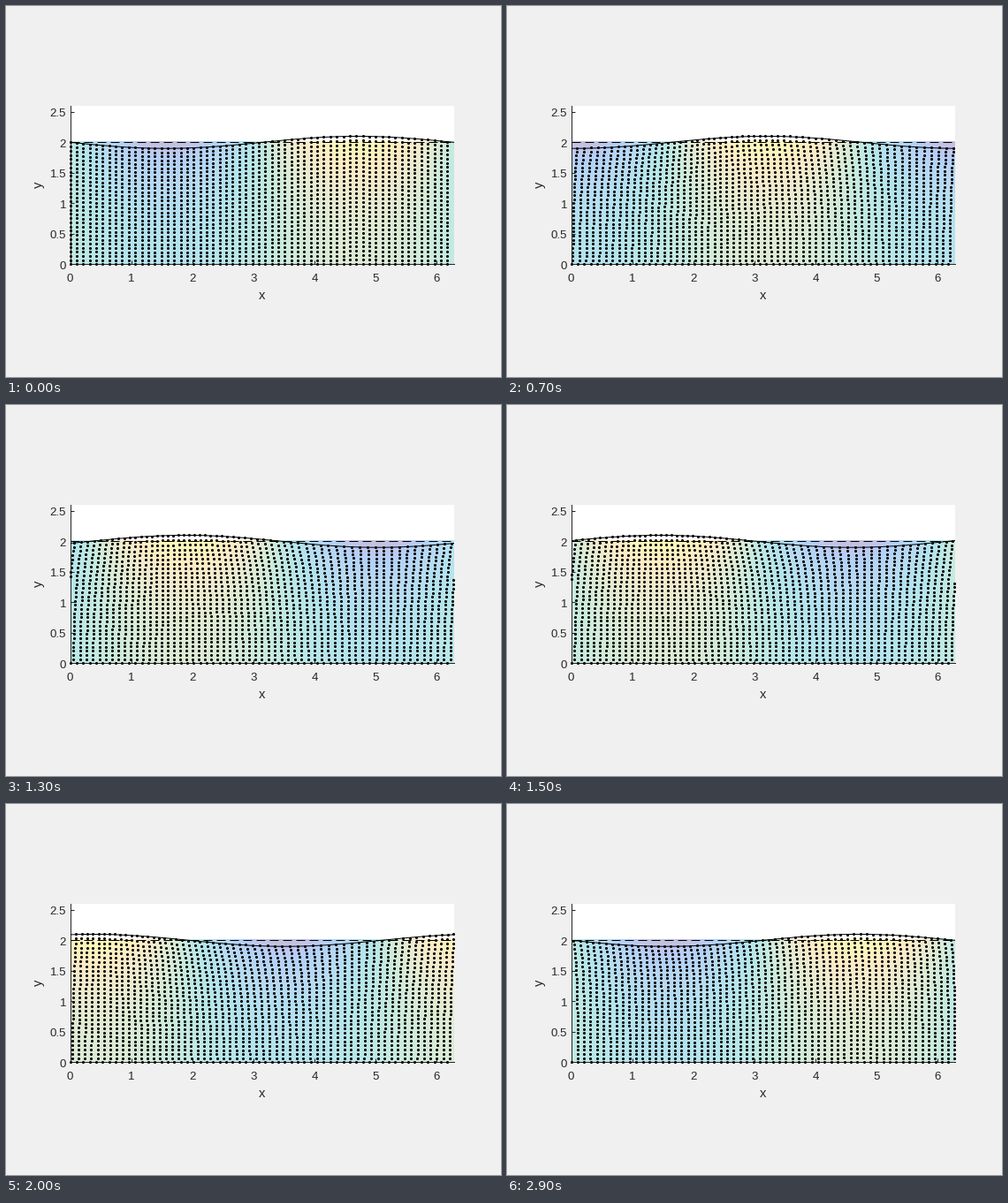
Write a matplotlib script that moves like this. It is 560 px wide and 420 px high and loops after 3000 ms.

```python
import numpy as np
import matplotlib.pyplot as plt
from matplotlib.animation import FuncAnimation
from matplotlib.colors import LinearSegmentedColormap

W, H, DPI = 560, 420, 100
FRAMES, INTERVAL = 30, 100
PX = 72 / DPI  # points per pixel

AMP, DEPTH, Y_MAX = 0.1, 2.0, 2.6
PERIOD = 2 * np.pi
COLS, ROWS = 59, 30
INK = "#262626"

plt.rcParams["font.family"] = "Liberation Sans"

STOPS = [
    (0.000, (0.208, 0.166, 0.529)), (0.063, (0.196, 0.265, 0.728)),
    (0.111, (0.059, 0.360, 0.868)), (0.159, (0.017, 0.427, 0.879)),
    (0.238, (0.078, 0.504, 0.838)), (0.317, (0.034, 0.597, 0.820)),
    (0.381, (0.023, 0.654, 0.777)), (0.444, (0.084, 0.693, 0.706)),
    (0.508, (0.218, 0.725, 0.619)), (0.571, (0.395, 0.746, 0.524)),
    (0.651, (0.610, 0.747, 0.434)), (0.730, (0.786, 0.736, 0.363)),
    (0.794, (0.914, 0.726, 0.306)), (0.841, (0.994, 0.746, 0.240)),
    (0.905, (0.979, 0.827, 0.163)), (0.952, (0.959, 0.895, 0.113)),
    (1.000, (0.976, 0.983, 0.054)),
]
CMAP = LinearSegmentedColormap.from_list("water", STOPS, N=256)


def phase(frame):
    return PERIOD * frame / (FRAMES - 1)


def elevation(x, ph):
    return -AMP * np.sin(x + ph)


def velocity(pos, ph):
    """Linear wave velocity per unit of phase; the bed row stays put."""
    x, y = pos
    u = AMP * np.sin(x + ph) * np.cosh(y) / np.sinh(DEPTH)
    v = -AMP * np.cos(x + ph) * np.sinh(y) / np.sinh(DEPTH)
    return np.array([u, v]) * (y > 0)


def rk4(pos, ph, h):
    k1 = velocity(pos, ph)
    k2 = velocity(pos + h / 2 * k1, ph + h / 2)
    k3 = velocity(pos + h / 2 * k2, ph + h / 2)
    k4 = velocity(pos + h * k3, ph + h)
    return pos + h / 6 * (k1 + 2 * k2 + 2 * k3 + k4)


def particle_paths(substeps=4):
    x, s = np.meshgrid(np.arange(COLS) * PERIOD / COLS, np.linspace(0, 1, ROWS))
    pos = np.array([x, s * (DEPTH + elevation(x, 0))])
    h = phase(1) / substeps
    paths = [pos]
    for frame in range(FRAMES - 1):
        for k in range(substeps):
            pos = rk4(pos, phase(frame) + k * h, h)
        paths.append(pos)
    return paths


paths = particle_paths()

fig = plt.figure(figsize=(W / DPI, H / DPI), dpi=DPI, facecolor="#f0f0f0")
left, top, width = 72.6, 112.9, 434.0
height = Y_MAX * width / PERIOD
bottom = top + height
ax = fig.add_axes([left / W, 1 - bottom / H, width / W, height / H])
ax.set(xlim=(0, PERIOD), ylim=(0, Y_MAX), xticks=range(7),
       yticks=np.arange(0, 2.6, 0.5), facecolor="white")
ax.tick_params(direction="in", length=4.3 * PX, width=PX, color=INK,
               labelbottom=False, labelleft=False)
for side, spine in ax.spines.items():
    spine.set(visible=side in ("left", "bottom"), linewidth=PX, color=INK)


def label(px, py, text, size, **kw):
    fig.text(px / W, 1 - py / H, text, fontsize=size * PX, color=INK,
             va="baseline", rotation_mode="anchor", **kw)


scale = width / PERIOD
for n in range(7):
    label(left + n * scale, 312.3, str(n), 13.3, ha="center")
for n in range(6):
    label(68, bottom - n * scale / 2 + 5.3, f"{n / 2:g}", 13.3, ha="right")
label(left + width / 2, 331.5, "x", 14.7, ha="center")
label(41, 202.5, "y", 14.7, ha="center", rotation=90)

# Pressure field, fixed to the still-water rectangle
NX, NY = 434, 138
gx = (np.arange(NX) + 0.5) * PERIOD / NX
gy = (np.arange(NY) + 0.5) * DEPTH / NY
decay = (np.cosh(gy) / np.cosh(DEPTH))[:, None]

field = ax.imshow(np.zeros((NY, NX)), extent=(0, PERIOD, 0, DEPTH), origin="lower",
                  aspect="auto", cmap=CMAP, vmin=-1, vmax=1, alpha=0.3, zorder=0.5)
ax.plot([0, PERIOD], [DEPTH, DEPTH], color="black", lw=PX, dashes=(10, 5),
        dash_capstyle="butt", zorder=2.6)
surface, = ax.plot([], [], color="black", lw=PX, zorder=2.7)
dots, = ax.plot([], [], "o", color="black", ms=3.1 * PX, mew=0,
                clip_on=False, zorder=2.8)
sx = np.linspace(0, PERIOD, 200)


def draw(frame):
    ph = phase(frame)
    field.set_data(decay * elevation(gx, ph) / AMP)
    surface.set_data(sx, DEPTH + elevation(sx, ph))
    x, y = paths[frame]
    dots.set_data(np.mod(x, PERIOD).ravel(), y.ravel())
    return field, surface, dots


anim = FuncAnimation(fig, draw, frames=FRAMES, interval=INTERVAL,
                     repeat=True, repeat_delay=0, blit=False)
plt.show()
```
